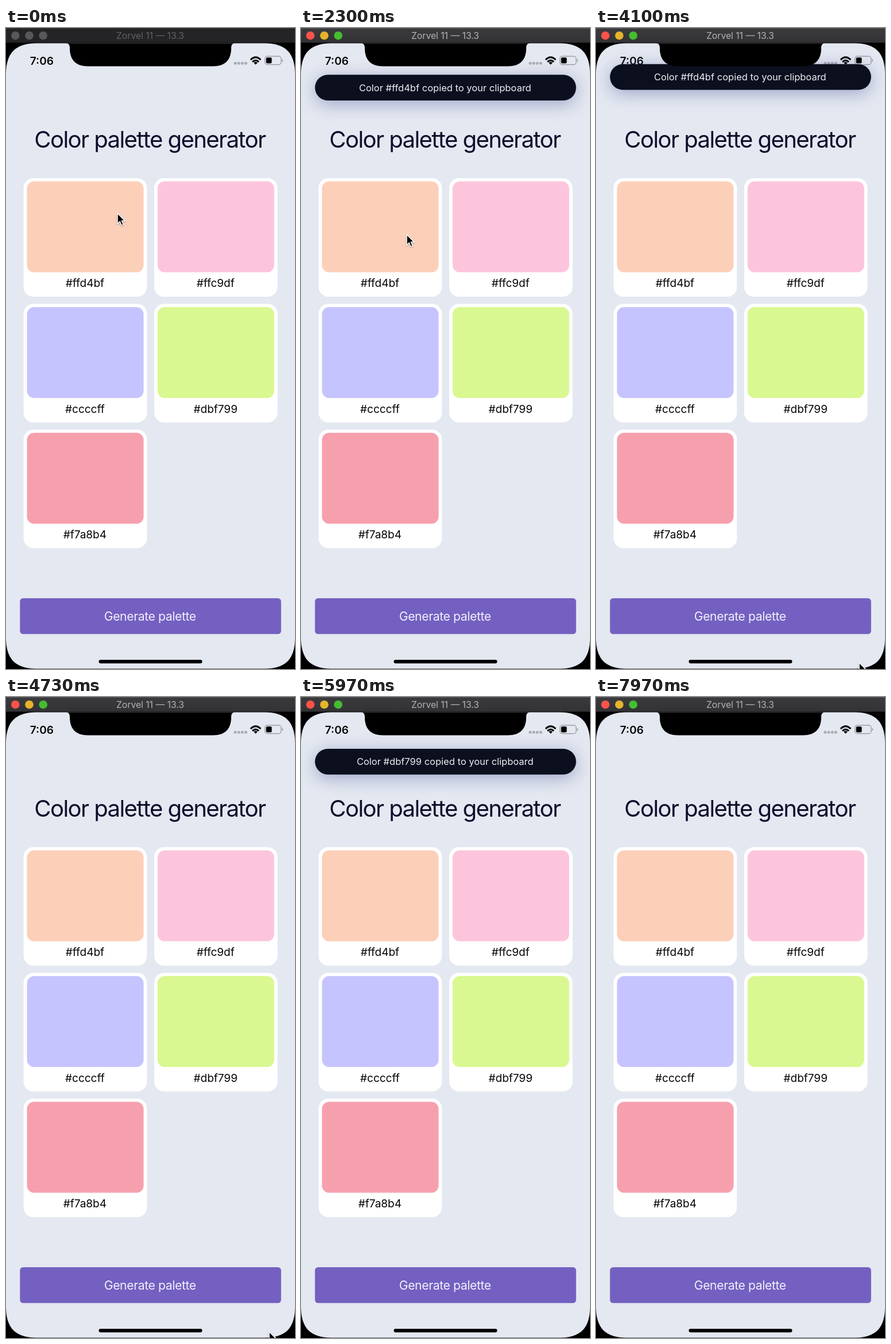
Animation, 503 px wide and 1114 px high, one loop 8 s. Source, as an HTML page:

```html
<!DOCTYPE html>
<html lang="en">
<head>
<meta charset="utf-8">
<title>Color palette generator</title>
<style>
  html, body { margin: 0; width: 100%; height: 100%; overflow: hidden; background: #000; }
  svg { display: block; width: 503px; height: 1114px; }
  text {
    font-family: Inter, Roboto, sans-serif;
    font-optical-sizing: none;
    text-anchor: middle;
  }
  #bar { fill: #242426; }
  #bar-edge { fill: #3c3c3e; }
  #bar-title { font-size: 15.7px; fill: #616163; }
  .light { fill: #58585a; }
  .active #bar { fill: url(#bar-fill); }
  .active #bar-edge { fill: #5a5a5d; }
  .active #bar-title { fill: #b3b3b5; }
  .active .light { fill: var(--lit); }
  #heading { font-size: 40px; letter-spacing: -.039em; fill: #0d0e2b; }
  .code { font-size: 19px; fill: #050505; }
  #button-text { font-size: 21.1px; letter-spacing: -.017em; fill: #f3f0fb; }
  #toast rect { fill: #0b0f1e; filter: drop-shadow(0 6px 15px rgba(55, 68, 140, .4)); }
  #toast text { font-size: 16.5px; fill: #eceef4; }
  #clock { font-size: 19px; font-weight: 600; fill: #050505; }
</style>
</head>
<body>
<svg id="stage" viewBox="0 0 503 1114">
  <defs>
    <linearGradient id="bar-fill" x2="0" y2="1">
      <stop stop-color="#3b3b3e"/>
      <stop offset="1" stop-color="#323235"/>
    </linearGradient>
    <clipPath id="screen-clip">
      <path id="screen-path" d="M0 80 C0 43 17 26.5 53 26.5 H450 C486 26.5 503 43 503 80 V1060 C503 1097 486 1113.5 450 1113.5 H53 C17 1113.5 0 1097 0 1060 Z"/>
    </clipPath>
  </defs>

  <rect width="503" height="1114"/>
  <rect id="bar" width="503" height="25.5"/>
  <rect id="bar-edge" width="503" height="1"/>
  <circle class="light" style="--lit:#ff524b" cx="16.3" cy="13.2" r="7.3"/>
  <circle class="light" style="--lit:#e6b42b" cx="40.5" cy="13.2" r="7.3"/>
  <circle class="light" style="--lit:#45bd31" cx="64.7" cy="13.2" r="7.3"/>
  <text id="bar-title" x="251" y="19">Zorvel 11 — 13.3</text>

  <g clip-path="url(#screen-clip)">
    <rect y="26" width="503" height="1088" fill="#e4e8f1"/>
    <text id="heading" x="250.4" y="208">Color palette generator</text>
    <g id="cards"></g>
    <rect x="24.3" y="991" width="454.5" height="62.3" rx="5.5" fill="#7460c1"/>
    <text id="button-text" x="250.8" y="1030">Generate palette</text>
    <rect x="161.5" y="1098" width="180" height="6.2" rx="3.1"/>

    <text id="clock" x="62.3" y="63.7">7:06</text>
    <g fill="#a9acb4">
      <circle cx="399" cy="61.2" r="2.5"/><circle cx="405.1" cy="61.2" r="2.5"/>
      <circle cx="411.2" cy="61.2" r="2.5"/><circle cx="417.3" cy="61.2" r="2.5"/>
    </g>
    <g fill="none" stroke="#050505" stroke-width="2.9">
      <path d="M425.7 55.2 Q434.5 46.6 443.3 55.2"/>
      <path d="M429 59 Q434.5 53.7 440 59"/>
    </g>
    <path d="M434.5 63.8 L431.3 60.5 Q434.5 57.6 437.7 60.5 Z"/>
    <rect x="450.7" y="49.2" width="28.2" height="14.4" rx="4" fill="none" stroke="#8f9299" stroke-width="1.2"/>
    <rect x="452.7" y="51.2" width="9.8" height="10.4" rx="2"/>
    <path d="M480.6 53.8 Q484 56.4 480.6 59 Z" fill="#8f9299"/>

    <g id="toast">
      <rect x="24.3" width="454.5" height="44.6" rx="22.3"/>
      <text id="toast-text" x="250.8" y="28.4"></text>
    </g>
    <path d="M103 26 C109 26.5 111 29 111 35 C111 55 121 66.5 143 66.5 H360 C382 66.5 392 55 392 35 C392 29 394 26.5 400 26 Z"/>
  </g>

  <path id="cursor" d="M0 0 V18.2 L4.2 14.3 L7 21 L10.3 19.6 L7.5 13.1 H13.2 Z"
        stroke="#fff" stroke-width="1.5" style="filter:drop-shadow(0 1px 1px rgba(0,0,0,.35))"/>
</svg>

<script>
const LOOP = 8000;
const ACTIVATE = 1840;
const REST_Y = 88.3, TRAVEL = 140;
const TOAST_HOLD = 1973, TOAST_EXIT = 300;
const FADE_IN = 110, FADE_OUT = 250;

// label, displayed colour
const palette = [
  ['#ffd4bf', '#fccfb9'],
  ['#ffc9df', '#fdc5dc'],
  ['#ccccff', '#c6c4fe'],
  ['#dbf799', '#d9f891'],
  ['#f7a8b4', '#f6a0ad'],
];

const taps = [
  { card: 0, down: 1850, up: 2000 },
  { card: 3, down: 5330, up: 5480 },
];

// time, x, y of the pointer tip
const track = [
  [0, 194, 322], [100, 194, 322], [750, 184, 359], [2680, 184, 359],
  [3230, 458, 1103], [5040, 458, 1103], [5300, 346, 556],
  [5540, 346, 556], [5810, 486, 1120],
];

const byId = id => document.getElementById(id);
const clamp = v => Math.min(1, Math.max(0, v));
const smooth = u => u * u * (3 - 2 * u);
const mix = (a, b, u) => a + (b - a) * u;

byId('cards').innerHTML = palette.map(([code, color], i) => `
  <g transform="translate(${30.6 + i % 2 * 227.3} ${261 + Math.floor(i / 2) * 218.5})">
    <rect width="214.7" height="206" rx="17" fill="#fff"/>
    <rect x="5.9" y="5.6" width="203" height="158" rx="12.5" fill="${color}"/>
    <text class="code" x="106.8" y="189">${code}</text>
  </g>`).join('');

const cards = [...byId('cards').children];

function cardOpacity(tap, t) {
  if (t < tap.up) return mix(1, .2, smooth(clamp((t - tap.down) / FADE_IN)));
  return mix(.2, 1, smooth(clamp((t - tap.up) / FADE_OUT)));
}

// Damped spring from rest above the screen, then an accelerating exit.
function toastY(age) {
  const s = age / 1000, decay = 9.3, freq = 6.7;
  const spring = Math.exp(-decay * s) *
    (Math.cos(freq * s) + decay / freq * Math.sin(freq * s));
  const out = clamp((age - TOAST_HOLD) / TOAST_EXIT);
  return REST_Y - TRAVEL * (spring + out * out);
}

function drawToast(t) {
  const tap = taps.find(({ up }) => t >= up && t < up + TOAST_HOLD + TOAST_EXIT);
  const toast = byId('toast');
  toast.style.display = tap ? '' : 'none';
  if (!tap) return;
  byId('toast-text').textContent = `Color ${palette[tap.card][0]} copied to your clipboard`;
  toast.setAttribute('transform', `translate(0 ${toastY(t - tap.up).toFixed(2)})`);
}

function drawCursor(t) {
  const next = track.findIndex(([time]) => time > t);
  const cursor = byId('cursor');
  cursor.style.display = next < 0 ? 'none' : '';
  if (next < 0) return;
  const [t0, x0, y0] = track[next - 1], [t1, x1, y1] = track[next];
  const u = smooth((t - t0) / (t1 - t0));
  cursor.setAttribute('transform', `translate(${mix(x0, x1, u)} ${mix(y0, y1, u)})`);
}

function draw(t) {
  byId('stage').classList.toggle('active', t >= ACTIVATE);
  for (const tap of taps) cards[tap.card].setAttribute('opacity', cardOpacity(tap, t));
  drawToast(t);
  drawCursor(t);
}

const start = performance.now();
function tick() {
  draw((performance.now() - start) % LOOP);
  requestAnimationFrame(tick);
}
tick();
</script>
</body>
</html>
```
